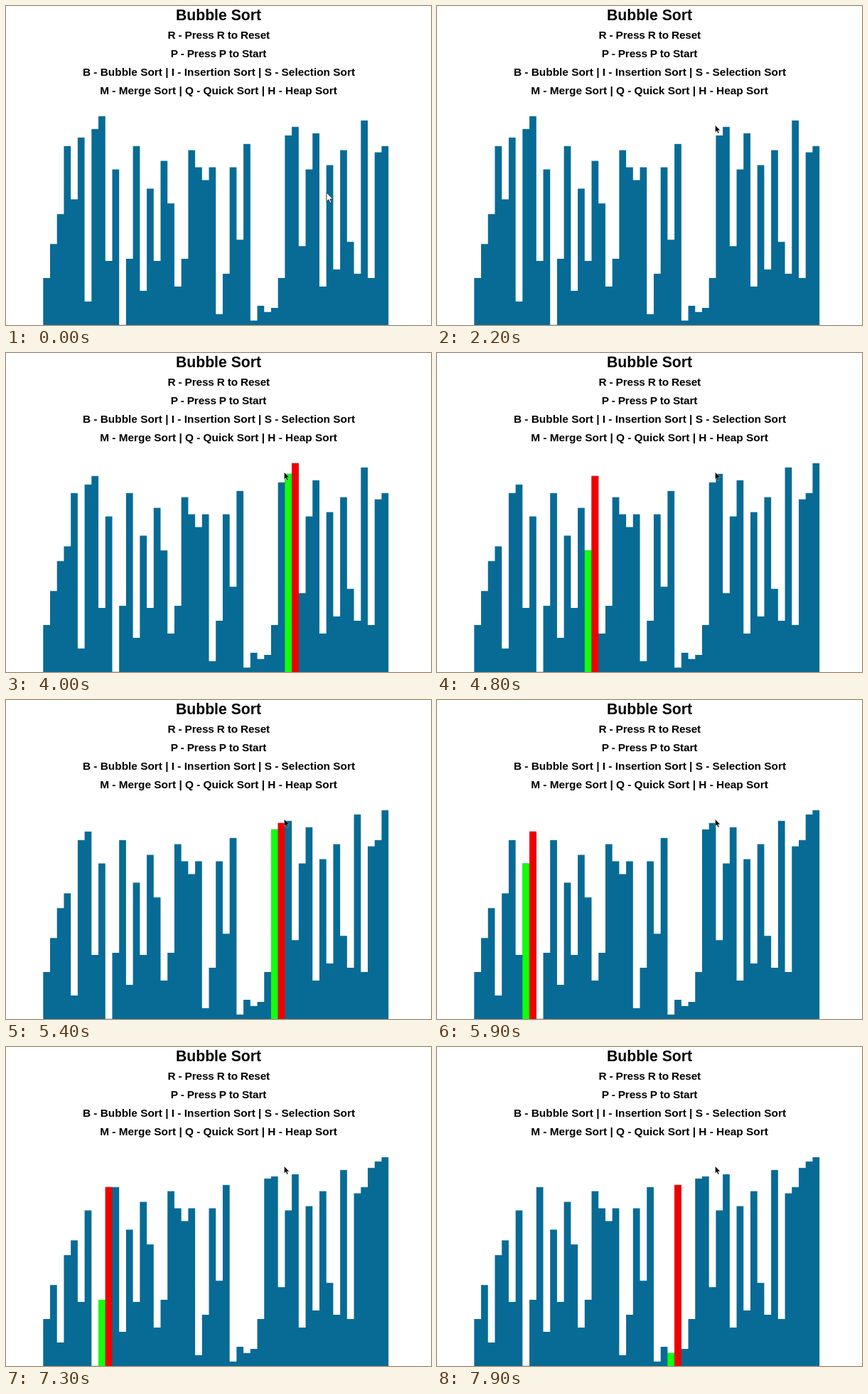
These frames come from a looping animation (598x448 px, 8 s). An HTML page:

```html
<!DOCTYPE html>
<html lang="en">
<head>
<meta charset="utf-8">
<title>Bubble Sort</title>
<style>
  html, body { margin: 0; width: 100%; height: 100%; overflow: hidden; background: #fff; }
  svg { display: block; width: 598px; height: 448px; }
  text { font: bold 15.4px "Liberation Sans", Arial, sans-serif; text-anchor: middle; }
  .title { font-size: 21.2px; }
  .key { letter-spacing: -.18px; }
  #bars { fill: #076b95; }
  #low { fill: #11ff0b; }
  #high { fill: #f00000; }
  #cursor { fill: #000; stroke: #fff; stroke-width: .5; stroke-linejoin: round; }
  #cursor.light { fill: #fff; stroke: #12303f; stroke-width: .8; }
</style>
</head>
<body>
<svg viewBox="0 0 598 448">
  <text class="title" x="299" y="20">Bubble Sort</text>
  <text class="key" x="299.3" y="46">R - Press R to Reset</text>
  <text class="key" x="299" y="72">P - Press P to Start</text>
  <text x="299.5" y="98">B - Bubble Sort | I - Insertion Sort | S - Selection Sort</text>
  <text x="299" y="124">M - Merge Sort | Q - Quick Sort | H - Heap Sort</text>
  <path id="bars"/>
  <path id="low"/>
  <path id="high"/>
  <path id="cursor" d="M0 0V12.5L2.9 9.8L4.9 14.4L6.9 13.5L4.9 9.1H8.8Z"/>
</svg>
<script>
const LOOP = 8000, TICK = 100;
const SORT_START = 2961, SWAPS_PER_MS = 0.0294;
const LEFT = 52.3, BAR = 9.7175, FLOOR = 447.8, UNIT = 2.99;

// the values being sorted
const values = [
  22, 38, 52, 84, 59, 88, 11, 92, 98, 30, 73, 0, 31, 84, 16, 64, 30, 77, 57, 18, 31, 82, 74, 68, 74,
  5, 24, 74, 40, 85, 2, 9, 6, 8, 22, 89, 93, 37, 73, 90, 18, 75, 26, 82, 39, 24, 96, 22, 81, 84
];

const byId = id => document.getElementById(id);
const cursor = byId('cursor');

// every swap as the index of its left bar, in the order bubble sort makes them
function listSwaps(list) {
  const a = list.slice(), swaps = [];
  for (let end = a.length - 1; end > 0; end--) {
    for (let j = 0; j < end; j++) {
      if (a[j] > a[j + 1]) {
        [a[j], a[j + 1]] = [a[j + 1], a[j]];
        swaps.push(j);
      }
    }
  }
  return swaps;
}
const swaps = listSwaps(values);

// outline of neighbouring bars, first one at index start
const outline = (bars, start) => {
  const x = i => LEFT + (start + i) * BAR;
  const steps = bars.map((v, i) => `V${FLOOR - v * UNIT}H${x(i + 1)}`);
  return `M${x(0)} 449${steps.join('')}V449Z`;
};

function drawBars(t) {
  const done = Math.max(0, Math.floor((t - SORT_START) * SWAPS_PER_MS));
  const a = values.slice();
  for (const j of swaps.slice(0, done)) [a[j], a[j + 1]] = [a[j + 1], a[j]];
  byId('bars').setAttribute('d', outline(a, 0));
  const at = swaps[done - 1];
  byId('low').setAttribute('d', done ? outline([a[at]], at) : '');
  byId('high').setAttribute('d', done ? outline([a[at + 1]], at + 1) : '');
}

const progress = (t, from, to) => Math.min(1, Math.max(0, (t - from) / (to - from)));

// the pointer leaves through the bottom, returns, then moves up to its rest
function drawCursor(t) {
  const out = progress(t, 300, 600);
  const back = progress(t, 800, 1600);
  const rest = progress(t, 1900, 2200);
  const x = 451 - 151 * out + 67 * back + 24.5 * rest;
  const y = 262 + 190 * out - 248 * back - 36.5 * rest;
  const light = back === 0;
  cursor.setAttribute('class', light ? 'light' : '');
  cursor.setAttribute('transform', `translate(${x} ${y}) scale(${light ? 1 : 0.8})`);
}

function frame(now) {
  const t = Math.floor((now % LOOP) / TICK) * TICK;
  drawBars(t);
  drawCursor(t);
  requestAnimationFrame(frame);
}
frame(0);
</script>
</body>
</html>
```
